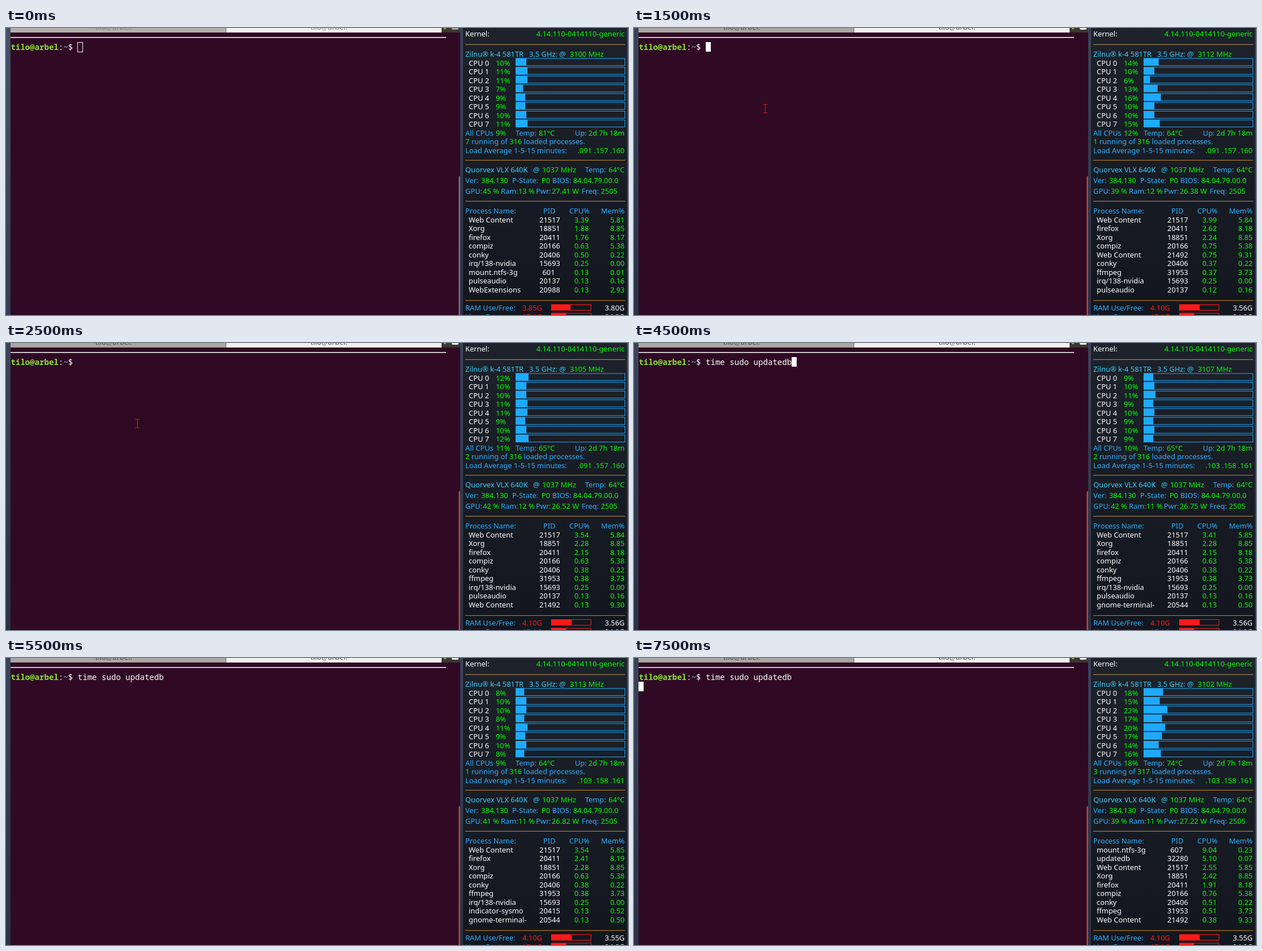
Animation, 1101 px wide and 509 px high, one loop 8 s. Source, as an HTML page:

```html
<!DOCTYPE html>
<html lang="en">
<head>
<meta charset="utf-8">
<title>Terminal and system monitor</title>
<style>
html, body { margin: 0; width: 100%; height: 100%; overflow: hidden; background: #1b202a; }
svg { display: block; }
text { font: 12.9px "Noto Sans", "Open Sans", sans-serif; white-space: pre; }
.mono { font: 14.1px "Noto Sans Mono", "DejaVu Sans Mono", monospace; }
.bold { font-weight: 700; }
</style>
</head>
<body>
<svg id="stage" width="1101" height="509" viewBox="0 0 1101 509"></svg>
<script>
const WHITE = '#fff', GREEN = '#00ff00', BLUE = '#2cb0ff', CYAN = '#38cdf8', RED = '#ff1a1a';
const USER = 'tilo@arbel', CHAR = 8.46, STEP = 15.57;

const PROCS = {
  W: ['Web Content', 21517], V: ['Web Content', 21492], X: ['Xorg', 18851],
  F: ['firefox', 20411], C: ['compiz', 20166], K: ['conky', 20406],
  I: ['irq/138-nvidia', 15693], M: ['mount.ntfs-3g', 601], N: ['mount.ntfs-3g', 607],
  P: ['pulseaudio', 20137], E: ['WebExtensions', 20988], G: ['ffmpeg', 31953],
  S: ['indicator-sysmo', 20415], T: ['gnome-terminal-', 20544],
  B: ['bamfdaemon', 19941], U: ['updatedb', 32280]
};

// MHz | cores | all | temp | running | loaded | load | gpu | vram | watts | used | free | processes
const STATS = [
  '3100|10 11 11 7 9 9 10 11|9|81|7|316|.091 .157 .160|45|13|27.41|3.85|3.80|W 3.39 5.81,X 1.88 8.85,F 1.76 8.17,C 0.63 5.38,K 0.50 0.22,I 0.25 0.00,M 0.13 0.01,P 0.13 0.16,E 0.13 2.93',
  '3106|12 10 9 10 12 9 10 13|11|68|2|316|.091 .157 .160|42|12|26.90|4.08|3.58|W 3.64 5.83,X 2.13 8.85,F 2.01 8.18,C 0.63 5.38,K 0.38 0.22,G 0.38 3.73,I 0.25 0.00,P 0.13 0.16,V 0.13 9.31',
  '3112|14 10 6 13 16 10 10 15|12|64|1|316|.091 .157 .160|39|12|26.38|4.10|3.56|W 3.99 5.84,F 2.62 8.18,X 2.24 8.85,C 0.75 5.38,V 0.75 9.31,K 0.37 0.22,G 0.37 3.73,I 0.25 0.00,P 0.12 0.16',
  '3105|12 10 10 11 11 9 10 12|11|65|2|316|.091 .157 .160|42|12|26.52|4.10|3.56|W 3.54 5.84,X 2.28 8.85,F 2.15 8.18,C 0.63 5.38,K 0.38 0.22,G 0.38 3.73,I 0.25 0.00,P 0.13 0.16,V 0.13 9.30',
  '3099|11 11 13 10 8 8 11 11|10|66|3|316|.103 .158 .161|44|12|26.67|4.09|3.56|W 3.17 5.84,X 2.28 8.85,F 1.90 8.18,C 0.63 5.38,K 0.38 0.22,G 0.38 3.73,I 0.25 0.00,P 0.25 0.16,V 0.25 9.30',
  '3107|9 10 11 9 10 9 10 9|10|65|2|316|.103 .158 .161|42|11|26.75|4.10|3.56|W 3.41 5.85,X 2.28 8.85,F 2.15 8.18,C 0.63 5.38,K 0.38 0.22,G 0.38 3.73,I 0.25 0.00,P 0.13 0.16,T 0.13 0.50',
  '3113|8 10 10 8 11 9 10 8|9|64|1|316|.103 .158 .161|41|11|26.82|4.10|3.55|W 3.54 5.85,F 2.41 8.19,X 2.28 8.85,C 0.63 5.38,K 0.38 0.22,G 0.38 3.73,I 0.25 0.00,S 0.13 0.52,T 0.13 0.50',
  '3101|11 13 13 10 13 8 11 11|11|64|4|318|.103 .158 .161|40|11|27.55|4.08|3.57|W 2.86 5.85,X 2.24 8.85,F 1.74 8.18,C 0.87 5.38,N 0.62 0.23,K 0.37 0.22,I 0.25 0.00,G 0.25 3.73,B 0.12 0.35',
  '3102|18 15 22 17 20 17 14 16|18|74|3|317|.103 .158 .161|39|11|27.22|4.10|3.55|N 9.04 0.23,U 5.10 0.07,W 2.55 5.85,X 2.42 8.85,F 1.91 8.18,C 0.76 5.38,K 0.51 0.22,G 0.51 3.73,V 0.38 9.33'
];

const COMMANDS = ['', '', '', '', 'clear', ...Array(4).fill('time sudo updatedb')];
// cursor per step: h hollow, s solid, - hidden, n solid on the next line
const CURSORS = 'hhs-ss--n';

const text = (x, y, s, fill, anchor = 'start', cls = '') =>
  `<text x="${x}" y="${y}" fill="${fill}" text-anchor="${anchor}" class="${cls}">${s}</text>`;
const span = (s, fill) => `<tspan fill="${fill}">${s}</tspan>`;
const right = (y, s, fill) => text(1095, y, s, fill, 'end');
const rect = (x, y, w, h, fill, extra = '') =>
  `<rect x="${x}" y="${y}" width="${w}" height="${h}" fill="${fill}" ${extra}/>`;
const rule = (y, fill) => rect(813, y, 283, 1, fill);
// a row of [x, text] pairs, alternating label and value colours
const row = (y, first, ...items) =>
  items.map(([x, s], i) => text(x, y, s, i % 2 ? GREEN : first)).join('');
const bar = (x, y, w, h, part, color) =>
  rect(x + .5, y + .5, w, h, 'none', `stroke="${color}"`) + rect(x, y, (w - 2) * part, h + 1, color);

function terminal(step) {
  const focus = step > 1, cmd = COMMANDS[step], cursor = CURSORS[step];
  const tabText = focus ? '#4d4b49' : '#82807d';
  const mono = (x, s, fill, cls = '') => text(x, 39, s, fill, 'start', 'mono ' + cls);
  let out = rect(0, 0, 8, 509, `url(#${focus ? 'edge' : 'edgeDim'})`)
    + rect(8, 0, 796, 509, '#300a24')
    + rect(8, 0, 381, 8, focus ? '#aaa6a2' : '#b3afab') + rect(389, 0, 1, 8, '#77736f')
    + rect(390, 0, 381, 8, '#f2f1f0')
    + rect(771, 0, 33, 8, '#3a3733') + rect(775, 0, 4, 2, '#a7a13a')
    + rect(789, -5, 12, 8, focus ? '#f2f1f0' : '#a5a19d', 'rx="2"')
    + text(158, 3, USER + ':', tabText) + text(539, 3, USER + ':', tabText)
    + rect(8, 16, 771, 1.5, '#fff')
    + rect(801.5, 263, 2, 246, focus ? '#cf5f3f' : '#918b8f')
    + mono(8.5, USER, '#8ae234', 'bold') + mono(8.5 + CHAR * 10, ':', WHITE)
    + mono(8.5 + CHAR * 11, '~', '#729fcf', 'bold') + mono(8.5 + CHAR * 12, '$', WHITE)
    + mono(127, cmd, WHITE);
  const x = Math.round(127 + cmd.length * CHAR);
  if (cursor === 'h') out += rect(126.7, 25.5, 9, 17, 'none', 'stroke="#fff"');
  if (cursor === 's') out += rect(x, 25, 9, 17, '#fff');
  if (cursor === 'n') out += rect(8, 42, 9, 17, '#fff');
  if (step === 2 || step === 3) {
    const beam = 'M228.5 135.5h3l1 1 1-1h3M232.5 136v14M228.5 150.5h3l1-1 1 1h3';
    out += `<path d="${beam}" fill="none" stroke="#140810" stroke-width="3"/>`
      + `<path d="${beam}" fill="none" stroke="#c01818" stroke-width="1.5"/>`;
  }
  return out;
}

function monitor(step) {
  const [mhz, cores, all, temp, running, loaded, load, gpu, vram, watts, used, free, procs] =
    STATS[step].split('|');
  let out = rect(804, 0, 297, 509, 'url(#edge)') + rect(809, 0, 290, 509, 'url(#panel)')
    + text(813, 15, 'Kernel:', WHITE) + right(15, '4.14.110-0414110-generic', GREEN)
    + rule(28.8, '#c39a5c')
    + text(813, 50.5, 'Zilnu® k-4 581TR', CYAN)
    + row(50.5, CYAN, [926, '3.5 GHz: @'], [998, mhz + ' MHz']);
  cores.split(' ').forEach((p, i) => {
    out += row(66.5 + i * STEP, WHITE, [819, 'CPU ' + i], [867, p + '%'])
      + bar(902, 53.6 + i * STEP, 193, 12.5, p / 100, '#1eaaff');
  });
  out += row(190.5, BLUE, [813, 'All CPUs'], [867, all + '%'], [902, 'Temp:'], [943, temp + '°C'], [1007, 'Up:'])
    + right(190.5, '2d 7h 18m', GREEN)
    + text(813, 206, running + span(' running of ', BLUE) + loaded + span(' loaded processes.', BLUE), GREEN)
    + text(813, 221.5, 'Load Average 1-5-15 minutes:', BLUE) + right(221.5, load, GREEN)
    + rule(234, '#c98b22')
    + text(813, 256, 'Quorvex VLX 640K', CYAN)
    + row(256, CYAN, [933, '@'], [949, '1037 MHz']) + text(1025, 256, 'Temp:', BLUE) + right(256, '64°C', GREEN)
    + row(275, BLUE, [813, 'Ver:'], [841, '384.130'], [896, 'P-State:'], [948, 'P0'], [967, 'BIOS:'], [1004, '84.04.79.00.0'])
    + row(294, BLUE, [813, 'GPU:'], [844, gpu + ' %'], [876, 'Ram:'], [907, vram + ' %'],
        [938, 'Pwr:'], [966, watts + ' W'], [1019, 'Freq:'], [1053, '2505'])
    + rule(306.7, '#c39a5c')
    + text(813, 328.5, 'Process Name:', BLUE) + text(951, 328.5, 'PID', BLUE)
    + text(997, 328.5, 'CPU%', BLUE) + right(328.5, 'Mem%', BLUE);
  procs.split(',').forEach((line, i) => {
    const [key, cpu, mem] = line.split(' '), [name, pid] = PROCS[key], y = 344.5 + i * STEP;
    out += text(819, y, name, WHITE) + text(pid < 1000 ? 960.5 : 962.5, y, pid, WHITE, 'middle')
      + text(1006, y, cpu, GREEN) + right(y, mem, GREEN);
  });
  return out + rule(482.8, '#c98b22')
    + text(813, 501, 'RAM Use/Free:', BLUE) + text(914, 501, used + 'G', RED)
    + bar(965, 490, 70, 10, used / (+used + +free), RED) + right(501, free + 'G', WHITE)
    + text(813, 516.5, 'Linux Root:', BLUE) + text(914, 516.5, '17.1G', RED)
    + bar(965, 505.5, 70, 10, .39, RED) + right(516.5, '24.8G', WHITE);
}

const gradient = (id, top, bottom) =>
  `<linearGradient id="${id}" x2="0" y2="1"><stop stop-color="${top}"/><stop offset="1" stop-color="${bottom}"/></linearGradient>`;
const DEFS = `<defs>${gradient('edge', '#3a4459', '#2a3145')}${gradient('edgeDim', '#465169', '#343d54')}${gradient('panel', '#1d222b', '#13161e')}</defs>`;

const stage = document.getElementById('stage');
let shown = -1;
function tick() {
  const step = Math.floor((performance.now() % 8000 + 500) / 1000);
  if (step !== shown) {
    shown = step;
    stage.innerHTML = DEFS + terminal(step) + monitor(step);
  }
  requestAnimationFrame(tick);
}
tick();
</script>
</body>
</html>
```
